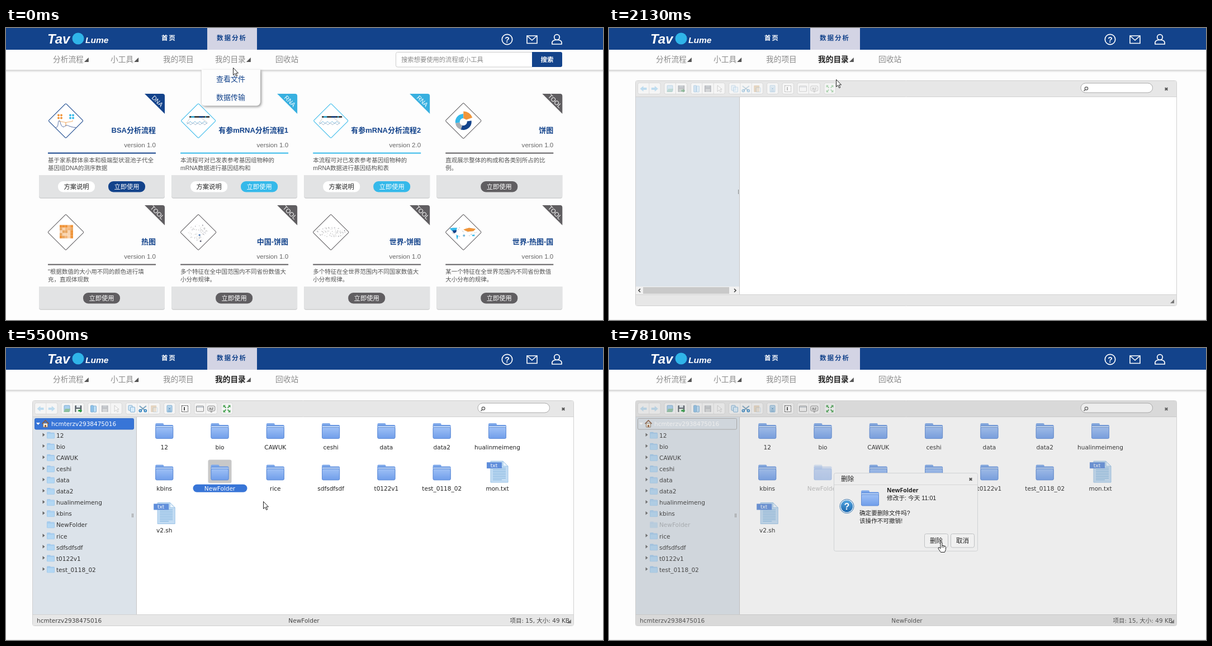
Write an HTML page with a canvas that moves like this. It is 1068 px wide and 524 px high and loops after 8000 ms.

```html
<!DOCTYPE html>
<html lang="zh">
<head>
<meta charset="utf-8">
<style>
html, body { margin: 0; width: 100%; height: 100%; overflow: hidden; background: #fdfdfd; }
canvas { display: block; }
</style>
</head>
<body>
<canvas id="stage" width="1068" height="524"></canvas>
<script>
const c = document.getElementById('stage').getContext('2d');
const LOOP = 8000;
const CJK = '"Noto Sans CJK SC","Noto Sans CJK",sans-serif';
const UI = '"Liberation Sans",' + CJK, WIDE = '"DejaVu Sans",' + CJK;
const NAVY = '#13438b', CYAN = '#35b9ea', GREY = '#605e61', PICK = '#3875d7';
const USER = 'hcmterzv2938475016';
const NEW = 'NewFolder';
const FILES = ['12', 'bio', 'CAWUK', 'ceshi', 'data', 'data2', 'hualinmeimeng', 'kbins',
  'rice', 'sdfsdfsdf', 't0122v1', 'test_0118_02', 'mon.txt', 'v2.sh'];
const SORTED = [...FILES.slice(0, 8), NEW, ...FILES.slice(8)];
const isFile = name => name.includes('.');

// time, x, y, hand
const PATH = [[0, 406, 71], [650, 407, 77], [860, 408, 84, 1], [1070, 408, 90, 1], [1280, 407, 92, 1],
  [2130, 406, 92], [2540, 408, 104], [2750, 425, 152], [2960, 449, 181], [3170, 464, 240],
  [3380, 484, 290], [3590, 492, 309], [3800, 522, 325], [4020, 550, 338], [5080, 535, 325],
  [5290, 500, 300], [5500, 460, 275], [5710, 425, 262], [5920, 400, 245], [6130, 381, 228],
  [6550, 392, 262], [6760, 412, 302], [7180, 470, 318], [7390, 540, 335], [7600, 582, 345, 1], [7810, 594, 348, 1]];

function rect(x, y, w, h, fill, r = 0, stroke) {
  c.beginPath();
  c.roundRect(x, y, w, h, r);
  paint(fill, stroke);
}
function paint(fill, stroke, lw = 1) {
  if (fill) { c.fillStyle = fill; c.fill(); }
  if (stroke) { c.strokeStyle = stroke; c.lineWidth = lw; c.stroke(); }
}
function poly(pts, fill, stroke, lw, open) {
  c.beginPath();
  for (let i = 0; i < pts.length; i += 2) c.lineTo(pts[i], pts[i + 1]);
  if (!open) c.closePath();
  paint(fill, stroke, lw);
}
const line = (pts, stroke, lw = 1) => poly(pts, null, stroke, lw, true);
function disc(x, y, r, fill, stroke, lw) {
  c.beginPath();
  c.arc(x, y, r, 0, 7);
  paint(fill, stroke, lw);
}
// y is the visual middle of the line
function text(s, x, y, size, color, { font = UI, style = '', align = 'left', gap = 0 } = {}) {
  c.font = `${style} ${size}px ${font}`;
  c.letterSpacing = gap + 'px';
  c.textAlign = align;
  c.fillStyle = color;
  c.fillText(s, x, y + size * .37);
  c.letterSpacing = '0px';
}
function at(x, y, draw, alpha = 1) {
  c.save();
  c.translate(x, y);
  c.globalAlpha *= alpha;
  draw();
  c.restore();
}
function fade(y0, y1, a, b) {
  const g = c.createLinearGradient(0, y0, 0, y1);
  g.addColorStop(0, a);
  g.addColorStop(1, b);
  return g;
}
function randomizer(seed) {
  return () => (seed = seed * 16807 % 2147483647) / 2147483647;
}

function header(inFiles) {
  rect(0, 0, 1068, 39, NAVY);
  rect(360, 0, 89, 39, '#d3d4e4');
  text('Tav', 74, 19.5, 24, '#fff', { style: 'italic bold' });
  disc(129, 19, 10.5, '#2fb4e8');
  text('Lume', 142, 21, 15.5, '#fff', { style: 'italic bold' });
  text('首页', 278, 17.5, 11.5, '#fff', { style: 'bold', gap: 1.7 });
  text('数据分析', 377, 17.5, 11.5, NAVY, { style: 'bold', gap: 2 });
  disc(896.5, 20.5, 9.2, null, '#fff', 1.7);
  text('?', 896.5, 20.5, 14, '#fff', { style: 'bold', align: 'center' });
  poly([932, 14, 950, 14, 950, 27.5, 932, 27.5], null, '#fff', 1.6);
  line([932, 14, 941, 22, 950, 14], '#fff', 1.6);
  c.beginPath();
  c.arc(985.5, 16.5, 4.8, 0, 7);
  c.moveTo(977, 29);
  c.bezierCurveTo(976, 23, 980, 21, 985.5, 21.5);
  c.bezierCurveTo(991, 21, 995, 23, 994, 29);
  c.closePath();
  paint(null, '#fff', 1.7);

  rect(0, 75, 1068, 5, fade(74, 80, '#c9c9c9', '#fdfdfd'));
  [['分析流程', 84, 1], ['小工具', 187, 1], ['我的项目', 281], ['我的目录', 374, 1], ['回收站', 482]].forEach(([s, x, arrow], i) => {
    const on = inFiles && i == 3, end = x + s.length * 13.7;
    text(s, x, 56, 13.7, on ? '#222' : '#8a8a8a', { style: on ? 'bold' : '' });
    if (arrow) poly([end + 9, 53, end + 9, 61, end + 1, 61], '#555');
  });
}

const CHARTS = {
  cross() {
    for (const x of [-13, -8, 8, 13]) for (const y of [-10, -5]) disc(x, y, 2, x < 0 ? '#f0953a' : CYAN);
    line([-11, -1, -11, 1, 0, 3, 12, 1, 12, -1], '#f0b070');
    line([0, 3, 0, 10], '#f0953a');
    c.beginPath();
    c.moveTo(-18, 12);
    c.bezierCurveTo(-12, 12, -15, 0, -12, 0);
    c.bezierCurveTo(-9, 0, -10, 12, -3, 11);
    c.bezierCurveTo(2, 4, 5, 12, 18, 12);
    paint(null, '#5871a5');
  },
  reads() {
    line([-16, -7, 20, -7], '#222', 2.4);
    line([-13, -7, -7, -7], CYAN, 2.4);
    line([1, -7, 9, -7], NAVY, 2.4);
    line([12, -7, 14, -7], CYAN, 2.4);
    line([-15, -5, -20, 3], '#ccc');
    line([5, -5, 16, 3], '#ccc');
    for (const dy of [3, 5.5]) {
      const wave = [];
      for (let x = -21; x < 17; x++) wave.push(x, dy + 1.6 * Math.sin(x * .75 + dy));
      line(wave, dy == 3 ? '#79b8dc' : '#9fb6cc');
    }
  },
  pie() {
    const slice = (a, b, color) => {
      c.beginPath();
      c.arc(0, 2, 10.5, a, b);
      paint(null, color, 8);
    };
    slice(-.15, 1.9, NAVY);
    slice(1.9, 3, '#a9adb3');
    slice(3, 4.7, CYAN);
    c.beginPath();
    c.moveTo(0, 0);
    c.arc(0, 0, 17, -1.57, -.35);
    paint('#f0953a');
    disc(0, 2, 6, '#fdfdfd');
  },
  heat() {
    const rnd = randomizer(77);
    for (let i = 0; i < 25; i++)
      rect(-11 + i % 5 * 4.8, -13 + Math.floor(i / 5) * 4.8, 4.8, 4.8, ['#f0953a', '#f5b77a', '#f9d3ae', '#e8a763'][rnd() * 4 | 0]);
  },
  dots(seed, n, rx, ry) {
    const rnd = randomizer(seed);
    for (let i = 0; i < n; i++) {
      const a = rnd() * 6.3, r = Math.sqrt(rnd());
      disc(Math.cos(a) * r * rx, Math.sin(a) * r * ry, .3 + rnd() * .5, i % 9 ? '#b5b5b5' : '#778');
    }
  },
  china() { CHARTS.dots(31, 85, 18, 15); disc(2, 5, 1.6, '#4d78b5'); disc(4, 16, 1.5, '#667'); },
  world() { CHARTS.dots(52, 120, 26, 9); },
  regions() {
    CHARTS.dots(15, 35, 24, 9);
    poly([-25, -7, -18, -8, -11, -8, -13, -3, -20, -2], CYAN);
    poly([-20, -3, -12, -4, -13, 0, -17, 2], NAVY);
    poly([-13, 5, -9, 6, -11, 13, -12, 11], CYAN);
    poly([0, -5, 10, -8, 22, -6, 18, -2, 8, -1, 3, -3], '#f0953a');
    poly([15, 5, 20, 4, 20, 7, 16, 7], CYAN);
    disc(1, 6, 2, '#79b8dc');
  }
};

const CARDS = [
  ['BSA分析流程', '1.0', 'DNA', 'cross', '基于家系群体亲本和极端型状混池子代全', '基因组DNA的测序数据', NAVY],
  ['有参mRNA分析流程1', '1.0', 'RNA', 'reads', '本流程可对已发表参考基因组物种的', 'mRNA数据进行基因结构和', CYAN],
  ['有参mRNA分析流程2', '2.0', 'RNA', 'reads', '本流程可对已发表参考基因组物种的', 'mRNA数据进行基因结构和表', CYAN],
  ['饼图', '1.0', 'TOOL', 'pie', '直观展示整体的构成和各类别所占的比', '例。', GREY],
  ['热图', '1.0', 'TOOL', 'heat', '"根据数值的大小用不同的颜色进行填', '充，直观体现数', GREY],
  ['中国-饼图', '1.0', 'TOOL', 'china', '多个特征在全中国范围内不同省份数值大', '小分布规律。', GREY],
  ['世界-饼图', '1.0', 'TOOL', 'world', '多个特征在全世界范围内不同国家数值大', '小分布规律。', GREY],
  ['世界-热图-国', '1.0', 'TOOL', 'regions', '某一个特征在全世界范围内不同省份数值', '大小分布的规律。', GREY]];

function pill(s, x, fill, color) {
  rect(x - 33, 157, 66, 19.5, fill, 9);
  text(s, x, 167, 11.3, color, { align: 'center' });
}
function card([title, version, tag, chart, a, b, color], i) {
  at(59 + i % 4 * 237.1, i < 4 ? 118 : 318, () => {
    c.beginPath();
    c.moveTo(189, 0);
    c.arcTo(225, 0, 225, 36, 4);
    c.lineTo(225, 36);
    paint(tag == 'RNA' ? '#38b0e0' : color);
    at(212, 13, () => {
      c.rotate(Math.PI / 4);
      text(tag, 0, 0, 11, '#fff', { align: 'center' });
    });
    at(48, 48.5, () => {
      const half = color == GREY ? 22.8 : 22;
      c.save();
      c.rotate(Math.PI / 4);
      rect(-half, -half, half * 2, half * 2, '#fff', 1.5, color);
      c.restore();
      CHARTS[chart]();
    });
    text(title, 209, 65.5, 13, NAVY, { style: 'bold', align: 'right' });
    text('version ' + version, 209, 91.5, 11.6, '#666', { align: 'right' });
    rect(16, 105.5, 193, 2, color);
    text(a, 16, 119, 10.5, '#555');
    text(b, 16, 133.5, 10.5, '#555');
    rect(0, 146, 225, 42, '#cfd0d1', [0, 0, 4, 4]);
    rect(0, 146, 225, 40.5, '#e2e3e4', [0, 0, 4, 4]);
    if (color == GREY) return pill('立即使用', 112, GREY, '#fff');
    pill('方案说明', 67, '#fff', '#222');
    pill('立即使用', 157, color, '#fff');
  });
}

function catalog(t) {
  header(false);
  rect(697.5, 43.5, 244, 26.5, '#fff', [3, 0, 0, 3], '#ccc');
  text('搜索想要使用的流程或小工具', 707, 56.5, 11.3, '#888');
  rect(941, 43, 54, 27, NAVY, [0, 3, 3, 0]);
  text('搜索', 968, 56.5, 11.5, '#fff', { style: 'bold', align: 'center' });
  CARDS.forEach(card);

  c.save();
  c.shadowColor = 'rgba(0,0,0,.4)';
  c.shadowBlur = 4;
  c.shadowOffsetX = c.shadowOffsetY = 2;
  rect(349, 75, 106, 64.5, '#fdfdfd', [0, 0, 7, 7]);
  c.restore();
  line([349.5, 75, 349.5, 136], '#ddd');
  text('查看文件', 376, 91, 13, NAVY);
  text('数据传输', 376, 124, 13, NAVY);
  if (t >= 1710) {
    c.setLineDash([1, 1]);
    rect(376.5, 83.5, 51, 16, null, 0, '#555');
    c.setLineDash([]);
  }
  if (t >= 860) {
    rect(-1, 518.5, 199.5, 8, '#fff', 0, '#bbb');
    text('file   dataset list  /view', 60, 527, 11, '#333');
  }
}

function folder(cx, cy, pale) {
  at(cx, cy, () => {
    rect(-16, -14, 15, 8, pale ? '#a3cbed' : '#7fa9ea', 2);
    rect(-16, -11, 32, 24, pale ? '#93c0e8' : '#6d9ae3', 2);
    rect(-15, -8.5, 30, 1.5, '#dcebfc');
    rect(-15.5, -6.5, 31, 20, pale ? '#b3d7f3' : fade(-7, 14, '#9fc1f6', '#6f9dea'), 2, pale ? '#93c0e8' : '#5f8cd6');
  });
}
function smallFolder(cx, cy) {
  at(cx, cy, () => {
    c.scale(.42, .42);
    folder(0, 0, true);
  });
}
function sheet(cx, cy) {
  at(cx, cy, () => {
    poly([-12, -19, 10, -19, 19, -10, 19, 19, -12, 19], '#c2dcf3', '#9cc3e6');
    poly([10, -19, 10, -10, 19, -10], '#e9f4fd', '#9cc3e6');
    for (let y = -7; y < 16; y += 3) line([-8, y + .5, y > 11 ? 8 : 15, y + .5], '#7eb0dc');
    rect(-19, -17, 27, 11, '#5f8edb');
    text('txt', -6, -11.5, 9, '#fff', { font: WIDE, align: 'center' });
  });
}

const page = (x, y, w, h, fill = '#d9ecfa') => rect(x, y, w, h, fill, 1, '#7faed2');
function floppy(mark) {
  rect(-6, -6, 12, 12, '#555d66', 1);
  rect(-3.5, -6, 7, 4, '#dfe5ea');
  rect(-4, 0, 8, 6, mark ? '#e8f3e8' : '#fff');
  if (mark) poly([0, 2, 3, 2, 3, 0, 7, 3.5, 3, 7, 3, 5, 0, 5], '#2f9e44');
}
const ICONS = {
  back() { poly([-6, 0, 0, -5, 0, -2, 6, -2, 6, 2, 0, 2, 0, 5], '#58b0e4'); },
  next() { c.scale(-1, 1); ICONS.back(); },
  mkdir() { page(-5, -6, 10, 11, '#a9d0ee'); poly([-6, 6, -3, 0, 6, 0, 4, 6], '#8fc1a0'); },
  upload() { floppy(true); },
  open() { page(-5, -6, 5, 12, '#8fc3ea'); page(0, -5, 5, 11, '#b9dcf5'); },
  save() { floppy(false); },
  point() { poly([-3, -6, -3, 5, 0, 2, 2, 6, 4, 5, 2, 1, 5, 1], '#fff', '#888'); },
  copy() { page(-5.5, -6, 7, 9); page(-2, -3, 8, 9); },
  cut() {
    line([-6, -5, 4, 3], '#7fa6c0', 2);
    line([6, -5, -4, 3], '#7fa6c0', 2);
    disc(-4.5, 3.5, 2, null, '#2f83c0', 1.7);
    disc(4.5, 3.5, 2, null, '#2f83c0', 1.7);
  },
  paste() { rect(-6, -6, 10, 12, '#c99a62', 1); page(-2, -2, 8, 8, '#f6f6f6'); },
  remove() { page(-4.5, -6, 9, 12, '#b9d6ec'); line([-2, -2, 2, 2], '#4d87b5'); line([2, -2, -2, 2], '#4d87b5'); line([-3, 4, 3, 4], '#4d87b5'); },
  rename() {
    c.setLineDash([2, 1]);
    rect(-5.5, -5.5, 11, 11, '#fff', 0, '#333');
    c.setLineDash([]);
    line([-1, -3, -1, 3], '#111', 1.5);
  },
  view() { rect(-6.5, -5, 13, 10, '#f3f3f3', 1, '#888'); rect(-6, -4.5, 12, 2.5, '#c3c9cf'); },
  sort() { rect(-6.5, -5, 13, 9, '#eee', 2, '#888'); text('az', 0, -1, 8, '#444', { align: 'center' }); disc(0, 5, 2, '#aaa'); },
  full() {
    for (const sx of [-1, 1]) for (const sy of [-1, 1]) {
      poly([sx * 6.5, sy * 6.5, sx * 2, sy * 6.5, sx * 6.5, sy * 2], '#4fa558');
      line([sx * 5, sy * 5, sx * 1.5, sy * 1.5], '#4fa558', 2);
    }
  }
};
const icon = (name, x, y, alpha) => at(x, y, ICONS[name], alpha);
const GROUPS = [[51, 'back', 'next'], [98.5, 'mkdir', 'upload'], [146, 'open', 'save', 'point'],
  [214, 'copy', 'cut', 'paste'], [282, 'remove'], [309.5, 'rename'], [336.5, 'view', 'sort'], [384.5, 'full']];
const ALWAYS = ['mkdir', 'upload', 'view', 'sort', 'full'];
const PICKED = ['open', 'copy', 'cut', 'remove', 'rename'];

function cross(x, y) {
  line([x - 2.3, y - 2.3, x + 2.3, y + 2.3], '#555', 2);
  line([x + 2.3, y - 2.3, x - 2.3, y + 2.3], '#555', 2);
}

function frame(s) {
  rect(47.5, 94.5, 968, 404, '#fff', 3, '#d0d0d0');
  rect(48, 95, 967, 28, '#e7e7e7');
  rect(48, 478, 967, 20, '#e7e7e7');
  rect(48, 124, 185, 354, '#dce3ea');
  line([48, 123.5, 1015, 123.5], '#d2d2d2');
  line([233.5, 124, 233.5, 478], '#c6c6c6');
  line([48, 478.5, 1015, 478.5], '#d2d2d2');
  for (const [x, ...names] of GROUPS) {
    rect(x + .5, 98.5, names.length * 20.3, 20, '#f5f5f5', 3, '#d9d9d9');
    names.forEach((n, i) => {
      if (i) line([x + i * 20.3 + .5, 99, x + i * 20.3 + .5, 118], '#ddd');
      const on = s.loaded && ALWAYS.includes(n) || s.picked && PICKED.includes(n);
      icon(n, x + 10.5 + i * 20.3, 109, on ? 1 : .35);
    });
  }
  rect(844, 99, 128.5, 17, '#fff', 8.5, '#aaa');
  disc(854, 108.5, 2.7, null, '#555', 1.2);
  line([852, 110.5, 849.5, 113], '#555', 1.5);
  cross(997, 109.5);
  poly([1011, 487, 1011, 494, 1004, 494], '#777');
  line([0, 523.5, 1068, 523.5], '#ececec');
}

function tree(s) {
  rect(51.5, 126.5, 177, 19.5, s.dialog ? null : PICK, 2, s.dialog ? '#aaa' : '#3069c6');
  poly([54, 134, 61, 134, 57.5, 138], '#fff');
  rect(66.5, 135, 8, 7, '#f6efe2', 0, '#876');
  line([64.5, 136, 70.5, 130, 76.5, 136], '#8a5a3c', 1.7);
  rect(69, 138, 3, 4, '#a0673f');
  text(USER, 81, 136.5, 10.5, '#fff', { font: WIDE });
  s.tree.forEach((name, i) => {
    const y = 156.6 + i * 20.07;
    if (name != NEW) poly([65.5, y - 4, 69.5, y - .8, 65.5, y + 2.4], '#666');
    c.globalAlpha = s.dialog && name == NEW ? .3 : 1;
    smallFolder(80, y);
    text(name, 90, y + .4, 10.5, '#333', { font: WIDE });
    c.globalAlpha = 1;
  });
}

function cells(s) {
  const [hx, hy] = s.probe;
  s.files.forEach((name, i) => {
    const x = 283.2 + i % 7 * 99.3, top = 125.3 + Math.floor(i / 7) * 74.4;
    const hover = !s.dialog && !s.menu1 && Math.abs(hx - x) < 48.5 && hy > top && hy < top + 64;
    const picked = name == NEW && s.picked && !s.dialog;
    const editing = name == NEW && s.editing;
    if (hover) rect(x - 48.5, top, 97, 64.5, '#ececec', 3);
    if (picked || editing) rect(x - 21, top + .7, 42, 42, '#c8c8c8', 3);
    c.globalAlpha = s.dialog && name == NEW ? .3 : 1;
    if (isFile(name)) sheet(x, top + 22.4);
    else folder(x, top + 23.7);
    if (editing) {
      rect(x - 47.5, top + 45.2, 95, 13.5, '#fff', 6.5, '#5b8be0');
      rect(x - 25, top + 45.7, 51, 12.5, '#3399ff');
      text(NEW, x, top + 52, 11, '#fff', { align: 'center' });
    } else {
      if (picked) rect(x - 48, top + 45, 97, 14, PICK, 7);
      text(name, x, top + 52.7, 10.5, picked ? '#fff' : '#222', { font: WIDE, align: 'center' });
    }
    c.globalAlpha = 1;
  });
}

function menu(x, y, items, [mx, my]) {
  c.save();
  c.shadowColor = 'rgba(0,0,0,.25)';
  c.shadowBlur = 3;
  rect(x + .5, y + .5, 90, 106, '#fff', 2, '#aaa');
  c.restore();
  items.forEach(([name, label], i) => {
    const iy = y + 13.5 + i * 20;
    if (mx > x + 3 && Math.abs(my - iy) < 10) rect(x + 2, iy - 10, 87, 20, '#e4e4e4');
    icon(name, x + 13, iy, 1);
    text(label, x + 24, iy, 10.7, '#333');
  });
}
const BLANK_MENU = [['upload', '上传文件'], ['mkdir', '新建文件夹'], ['paste', '粘贴'], ['view', '视图'], ['sort', '排序']];
const ITEM_MENU = [['upload', '上传文件'], ['copy', '复制'], ['cut', '剪切'], ['remove', '删除'], ['rename', '重命名']];

function dialog() {
  rect(48, 95, 967, 403, 'rgba(155,155,155,.18)');
  rect(402.5, 224.5, 257, 140, '#ededed', 3, '#d0d2d4');
  line([403, 245.5, 659, 245.5], '#d6d6d6');
  text('删除', 415, 235, 11.7, '#222');
  cross(647, 235.5);
  disc(425.5, 284, 11.5, fade(272, 296, '#58a9e2', '#1763ab'), '#fff', 1.5);
  disc(425.5, 284, 12.5, null, '#2a6ca8');
  text('?', 425.5, 284, 16, '#fff', { style: 'bold', align: 'center' });
  folder(467, 269.5);
  text(NEW, 497, 255.5, 10.5, '#222', { font: '"Open Sans",sans-serif', style: 'bold' });
  text('修改于: 今天 11:01', 497, 269, 10.7, '#222');
  text('确定要删除文件吗?', 448, 296.5, 10.6, '#222');
  text('该操作不可撤销!', 448, 310.5, 10.6, '#222');
  for (const [x, s] of [[564.5, '删除'], [611.5, '取消']]) {
    rect(x, 333.5, 42, 24.5, '#f0f0f0', 3, '#bfc1c3');
    text(s, x + 21, 346, 11.5, '#222', { align: 'center' });
  }
}

function manager(t, mouse) {
  const done = t >= 5080;
  const s = {
    loaded: t >= 2540, picked: done, dialog: t >= 6970,
    menu1: t >= 3590 && t < 4230, menu2: t >= 6340 && t < 6970,
    editing: t >= 4440 && t < 4870,
    tree: (done ? SORTED : FILES).filter(n => !isFile(n)),
    files: done ? SORTED : t >= 4230 ? [NEW, ...FILES] : FILES
  };
  // an open item menu keeps the hover where it was opened
  s.probe = s.menu2 ? [383, 230] : mouse;
  header(true);
  frame(s);
  if (!s.loaded) {
    rect(48, 464, 185, 14, '#f1f1f1');
    rect(61, 465, 154, 12, '#c9c9c9');
    line([56, 468, 53, 471, 56, 474], '#444', 1.6);
    line([224, 468, 227, 471, 224, 474], '#444', 1.6);
    line([231.5, 290, 231.5, 298], '#888');
    return;
  }
  line([225.5, 297, 225.5, 304], '#999');
  line([227.5, 297, 227.5, 304], '#999');
  tree(s);
  cells(s);
  text(USER, 55, 489, 10.5, '#444', { font: WIDE });
  if (done) text(NEW, 533, 489, 10.5, '#444', { font: WIDE, align: 'center' });
  text(`项目: ${done ? 15 : 14}, 大小: 49 KB`, 1008, 489, 10.5, '#444', { font: WIDE, align: 'right' });
  if (s.menu1) menu(492, 309, BLANK_MENU, mouse);
  if (s.menu2) menu(384, 230, ITEM_MENU, mouse);
  if (s.dialog) dialog();
}

function cursor(x, y, hand) {
  at(x + .5, y + .5, () => {
    if (!hand) return poly([0, 0, 0, 13, 3, 10.2, 5.2, 15, 7.3, 14.2, 5, 9.5, 9, 9.5], '#fff', '#222');
    poly([-1.5, 1, 0, 0, 1.5, 1, 1.5, 6, 4, 6, 5, 7, 7, 7, 8, 9, 8, 13, 6, 18, -1, 18, -5.5, 11.5, -5, 9.5, -3, 9.7, -1.5, 11.5], '#fff', '#222');
    for (const fx of [1.5, 4.5]) line([fx, 6, fx, 10], '#222');
  });
}

const start = performance.now();
function draw() {
  const t = (performance.now() - start) % LOOP;
  const [, x, y, hand] = PATH.findLast(p => p[0] <= t);
  rect(0, 0, 1068, 524, '#fdfdfd');
  if (t < 1920) catalog(t);
  else if (t >= 2130) manager(t, [x, y]);
  cursor(x, y, hand);
  requestAnimationFrame(draw);
}
draw();
</script>
</body>
</html>
```
